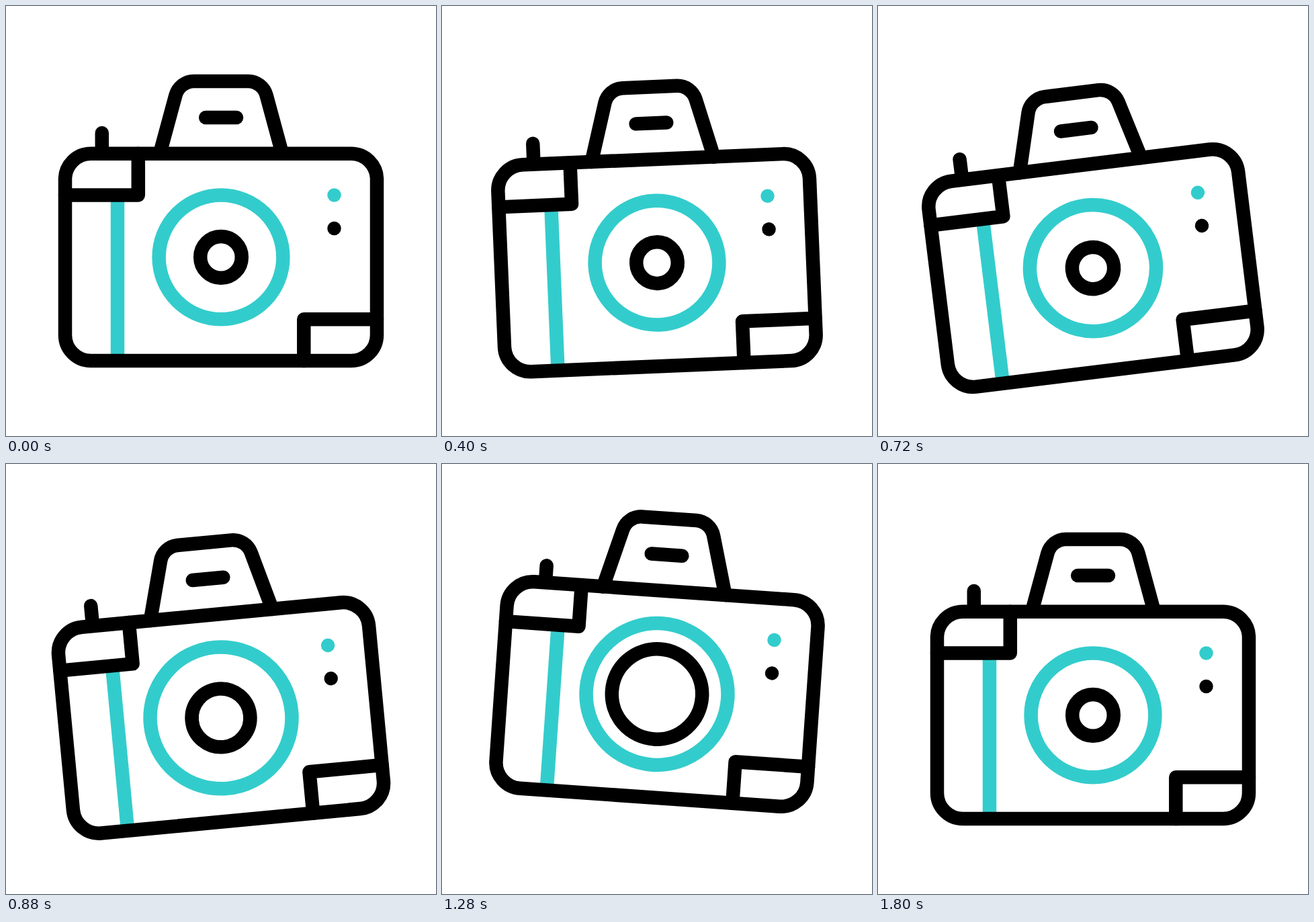
Recreate the animation shown at these times as an HTML page. Size 640 by 640 pixels, loop 1.92 s.

```html
<!DOCTYPE html>
<html lang="en">
<head>
<meta charset="utf-8">
<title>Camera</title>
<style>
  html, body { margin: 0; height: 100%; overflow: hidden; background: #fff; }
  svg { display: block; width: 100vw; height: 100vh; }
  .line { fill: none; stroke: #000; stroke-width: 20.5; stroke-linecap: round; stroke-linejoin: round; }
  .teal { stroke: #3cc; }
</style>
</head>
<body>
<svg viewBox="0 0 640 640">
  <g id="camera" class="line">
    <path class="teal" d="M166 282V528" stroke-linecap="butt"/>
    <path id="button"/>
    <path d="M228.9 219.8L252.4 133A28.4 28.4 0 0 1 279.5 112H360.5A28.4 28.4 0 0 1 387.6 133L411.1 219.8"/>
    <path d="M297.2 166H343"/>
    <rect x="88" y="219.8" width="464" height="308.2" rx="38.3"/>
    <path d="M88 281.4H196.8V219.8M443.3 528V466.3H552"/>
    <path class="teal" d="M488.5 281.4h0"/>
    <path d="M488.5 331h0"/>
    <circle id="ring" class="teal" cx="320" cy="373.9"/>
    <circle id="lens" cx="320" cy="373.9"/>
  </g>
</svg>
<script>
const LOOP = 1920, STEP = 40;
const [camera, button, ring, lens] =
  ['camera', 'button', 'ring', 'lens'].map(id => document.getElementById(id));

// Symmetric ease: cubic-bezier(.57, 0, .43, 1)
function ease(x) {
  let lo = 0, hi = 1;
  for (let i = 0; i < 24; i++) {
    const u = (lo + hi) / 2, v = 1 - u;
    if (1.71 * v * v * u + 1.29 * v * u * u + u ** 3 < x) lo = u; else hi = u;
  }
  return lo * lo * (3 - 2 * lo);
}

// Eased value at time t between [time, value] keys
function track(t, ...keys) {
  if (t <= keys[0][0]) return keys[0][1];
  for (let i = 1; i < keys.length; i++) {
    const [t0, a] = keys[i - 1], [t1, b] = keys[i];
    if (t < t1) return a + (b - a) * ease((t - t0) / (t1 - t0));
  }
  return keys[keys.length - 1][1];
}

function draw(now) {
  const t = Math.floor(now % LOOP / STEP) * STEP;
  const shift = track(t, [120, 0], [680, 16.5], [1200, -32.2], [1760, 0]);
  const angle = track(t, [160, 0], [720, -7], [1240, 4], [1800, 0]);
  const press = track(t, [760, 0], [1200, 5.7], [1640, 0]);
  camera.setAttribute('transform', `translate(0 ${shift}) rotate(${angle} 320 373.9)`);
  button.setAttribute('d', `M142.8 ${189 + press}V216`);
  ring.setAttribute('r', track(t, [600, 92.4], [1080, 111.5], [1560, 92.4]));
  lens.setAttribute('r', track(t, [680, 30.8], [1160, 70.7], [1640, 30.8]));
}

function tick() {
  draw(performance.now());
  requestAnimationFrame(tick);
}
tick();
</script>
</body>
</html>
```
